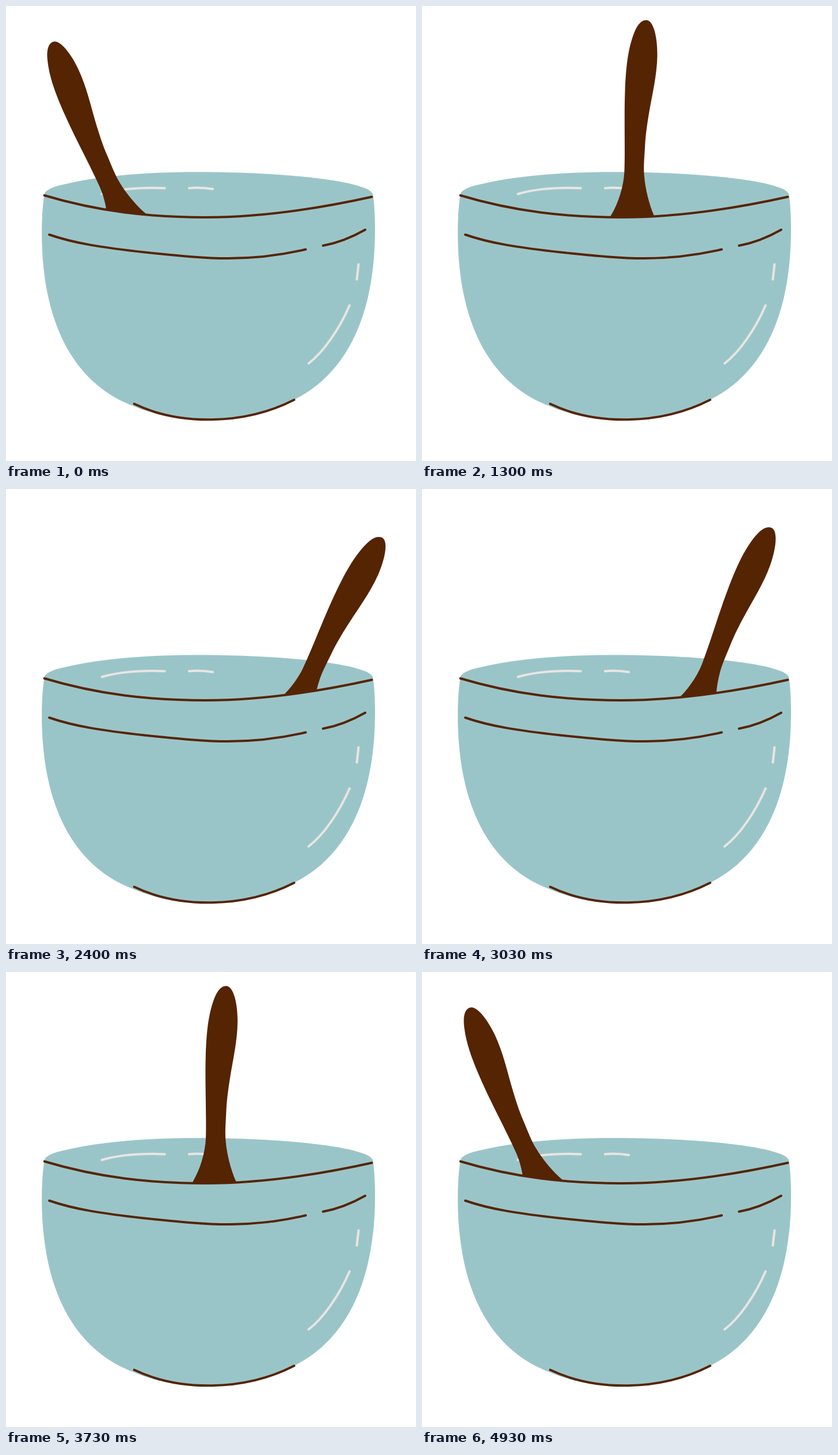
These frames come from a looping animation (710 by 788 pixels, 5.01 s). An HTML page:

```html
<!DOCTYPE html>
<html lang="en">
<head>
<meta charset="utf-8">
<title>Mixing bowl</title>
<style>
  html, body { margin: 0; width: 100%; height: 100%; overflow: hidden; background: #fff; }
  svg { display: block; width: 100vw; height: 100vh; }
  .bowl { fill: #9ac5c8; }
  .line { fill: none; stroke: #562405; stroke-width: 4; stroke-linecap: round; }
  .shine { fill: none; stroke: #e8e5e3; stroke-width: 4; stroke-linecap: round; }
  #spoon { fill: #552402; }
</style>
</head>
<body>
<svg viewBox="0 0 710 788">
  <!-- inside of the bowl -->
  <path class="bowl" d="M66 328 C66 320 80 313 100 309 C165 293 250 287 345 287.5
    C450 288 560 297 608 311 C626 316 636 321 636 330 L345 400 Z"/>
  <path class="shine" d="M166 325.5 C200 315.5 240 314 275 315.5 M317 315.5 C331 314 345 315 358 317"/>

  <path id="spoon" d="M378 24 C391 24 398 55 398 85 C398 120 390 152 384.5 189
    C381 213 379.5 228 379 245 C378 265 377 280 378.5 293 C380.5 316 388 343 396 361
    L414 400 H300 L322 363 C335 341 343 312 344 288 C345 250 342 190 343 150
    C344 105 347 75 357 47 C363 31 370 24 378 24 Z"/>

  <!-- front of the bowl -->
  <path class="bowl" d="M66 328 C63 350 62 370 62 392 C62 553 120 655 221 693
    C300 727 412 727 499.5 681.5 C580 642 639 550 639 388
    C639 365 638 347 636 330 L634 330
    C535 352 440 366 345 366 C250 366 160 356 66 328 Z"/>
  <path class="line" d="M66.5 328 C160 356 250 366 345 366 C440 366 535 352.3 633.5 330.5"/>
  <path class="line" d="M75 396 C118 411 168 418.5 240 426.5 C290 431.5 340 437 385 437
    C430 437 475 432 519 421.5 M549 415 C574 410.5 600 400 622 387.5"/>
  <path class="line" d="M222 689 C300 726.5 412 726.5 499 682"/>
  <path class="shine" d="M610.5 447.5 L607.5 473.5 M595 518.5 C577 560 550 599 524 619"/>
</svg>
<script>
const LOOP = 5010, STEPS = 100, HALF = STEPS / 2;
const PIVOT = { x: 344, y: 572 };
const SWING = 49.3, SLIDE = 114.5, UPRIGHT = 0.515;
const spoon = document.getElementById('spoon');

// Symmetric ease-in-out: cubic-bezier(k, 0, 1 - k, 1)
function ease(u, k) {
  u = Math.min(1, Math.max(0, u));
  let lo = 0, hi = 1;
  for (let i = 0; i < 24; i++) {
    const m = (lo + hi) / 2, w = 1 - m;
    const x = 3 * k * m * w * w + 3 * (1 - k) * m * m * w + m * m * m;
    if (x < u) lo = m; else hi = m;
  }
  return lo * lo * (3 - 2 * lo);
}

// Two pictures per 100 ms, changing at 0 and 30
function stepAt(ms) {
  const n = 2 * Math.floor(ms / 100) + (ms % 100 >= 30 ? 1 : 0);
  return Math.min(n, STEPS - 1);
}

function draw(ms) {
  const n = stepAt(ms);
  const p = n <= HALF ? ease(n / HALF, 0.39) : ease((STEPS + 0.6 - n) / HALF, 0.42);
  const d = p - UPRIGHT;
  spoon.setAttribute('transform',
    `translate(${(SLIDE * d).toFixed(2)} 0) rotate(${(SWING * d).toFixed(3)} ${PIVOT.x} ${PIVOT.y})`);
}

const start = performance.now();
function tick() {
  draw((performance.now() - start) % LOOP);
  requestAnimationFrame(tick);
}
draw(0);
requestAnimationFrame(tick);
</script>
</body>
</html>
```
